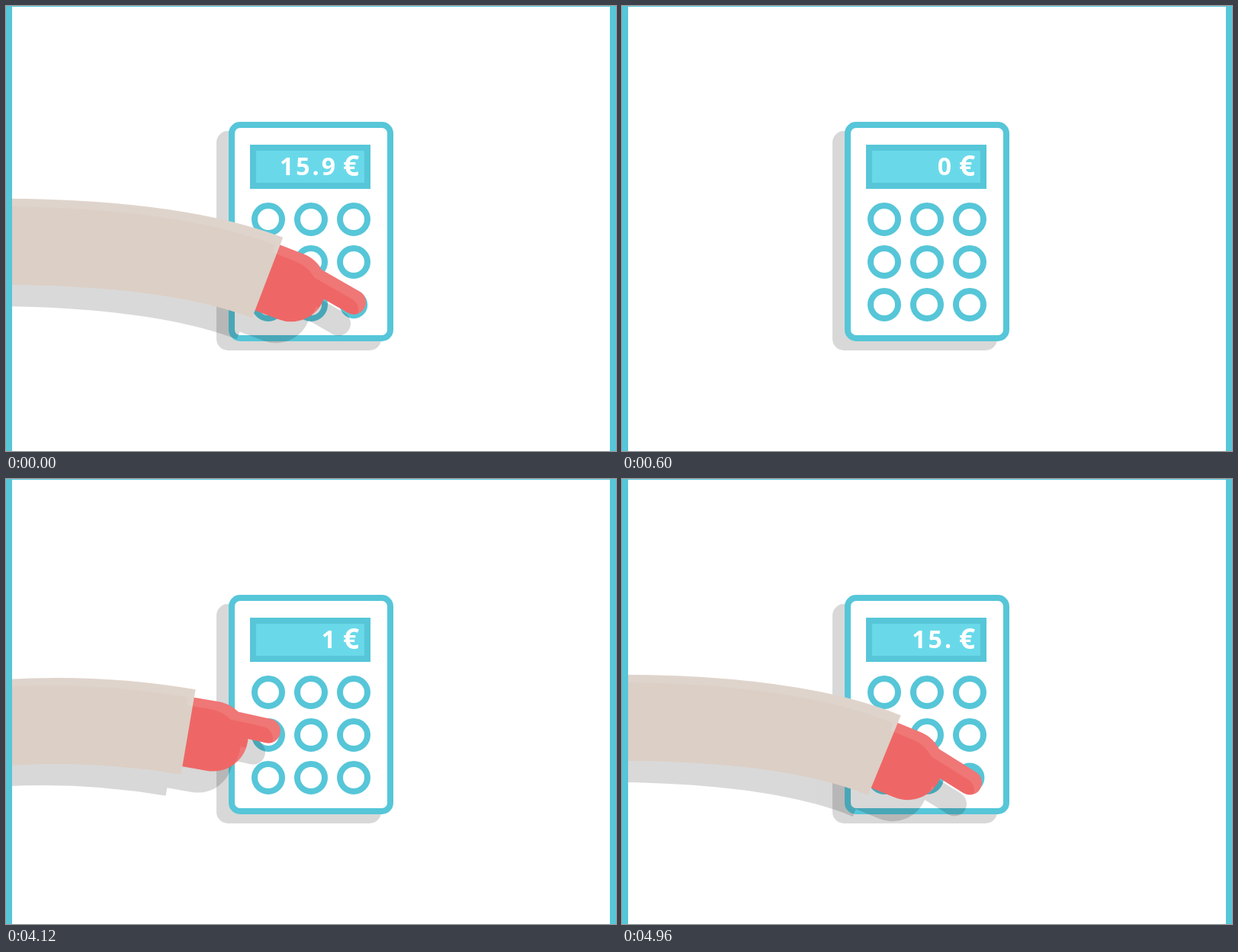
These frames come from a looping animation (800 by 584 pixels, 5000 ms). An HTML page:

```html
<!DOCTYPE html>
<html lang="en">
<head>
<meta charset="utf-8">
<title>Calculator</title>
<style>
  html, body { margin: 0; height: 100%; overflow: hidden; background: #fff; }
  svg { display: block; width: 800px; height: 584px; }
  text { font: 700 32px "Open Sans", "Noto Sans", sans-serif; fill: #fff; }
</style>
</head>
<body>
<svg viewBox="0 0 800 584">
  <defs>
    <g id="hand" fill="none" stroke-linecap="round">
      <path id="palm" stroke-width="92"/>
      <path id="finger" stroke-width="32"/>
    </g>
    <path id="sleeve" fill="none" stroke-width="113"/>
    <g id="arm"><use href="#hand"/><use href="#sleeve"/></g>
    <rect id="body" x="296" y="156" width="208" height="280" rx="11" stroke-width="8"/>
    <mask id="rim" maskUnits="userSpaceOnUse" x="0" y="0" width="800" height="584">
      <rect width="800" height="584" fill="#fff"/>
      <use href="#arm" x="-10" y="10" stroke="#000"/>
    </mask>
  </defs>
  <g opacity=".15"><use href="#body" x="-16" y="12" stroke="#000"/></g>
  <use href="#body" fill="#fff" stroke="#56c6d8"/>
  <rect x="324" y="186" width="150" height="50" fill="#69d9e9" stroke="#56c6d8" stroke-width="8"/>
  <text id="digits" x="435" y="222" text-anchor="end" letter-spacing="3">0</text>
  <text x="442" y="223" style="font-size:37px">€</text>
  <g id="keys" fill="#fff" stroke="#56c6d8"></g>
  <g id="actor">
    <use href="#arm" x="-20" y="28" stroke="#000" opacity=".15"/>
    <use href="#hand" stroke="#ee6766"/>
    <use href="#sleeve" stroke="#dccfc6"/>
    <g mask="url(#rim)"><use href="#arm" stroke="#fff" opacity=".11"/></g>
  </g>
  <path d="M0 0H800V584H792V1H8V584H0Z" fill="#56c6d8"/>
</svg>
<script>
const $ = id => document.getElementById(id);
const LOOP = 5000, ENTER = 3360, EXIT = 5600;
const OFFSTAGE = { x: -10, y: 262 };

const presses = [
  { at: 3750, leave: 3930, key: 0, shows: "1" },
  { at: 4280, leave: 4350, key: 6, shows: "15" },
  { at: 4690, leave: 4750, key: 7, shows: "15." },
  { at: 4955, leave: 4980, key: 8, shows: "15.9" },
  { at: 5240, leave: 5410, key: 2, shows: "0" }
];

const keys = Array.from({ length: 9 }, (_, i) => {
  const el = document.createElementNS("http://www.w3.org/2000/svg", "circle");
  const key = { el, x: 344 + i % 3 * 56, y: 280 + Math.floor(i / 3) * 56 };
  el.setAttribute("cx", key.x);
  el.setAttribute("cy", key.y);
  $("keys").appendChild(el);
  return key;
});

const easeIn = u => u * u;
const easeOut = u => 1 - (1 - u) ** 2;
const easeInOut = u => u * u * (3 - 2 * u);
const bump = (t, centre, width) => Math.max(0, 1 - Math.abs(t - centre) / width);

// The fingertip hops from key to key and dips at each press
function tipAt(t) {
  const i = presses.findIndex(p => p.leave > t);
  const next = presses[i], last = i < 0 ? presses.at(-1) : presses[i - 1];
  const from = last ? keys[last.key] : OFFSTAGE, to = next ? keys[next.key] : OFFSTAGE;
  const begin = last ? last.leave : ENTER, end = next ? next.at - 40 : EXIT;
  const ease = !last ? easeOut : !next ? easeIn : easeInOut;
  const u = ease(Math.min(1, (t - begin) / (end - begin)));
  const hop = last && next ? 108 * u * (1 - u) : 0;
  const dip = Math.max(...presses.map(p => 7 * bump(t, p.at, 60)));
  return { x: from.x + (to.x - from.x) * u, y: from.y + (to.y - from.y) * u - hop + dip };
}

// The rest of the arm follows from where the fingertip is on the keypad
function drawArm(tip) {
  const across = (tip.x - 342) / 114, u = Math.max(0, across), v = (tip.y - 280) / 112;
  const angle = (6 - .4 * u + v * (8.2 + 7.6 * u ** 3)) * Math.PI / 180;
  const cos = Math.cos(angle), sin = Math.sin(angle);
  const from = (p, x, y) => ({ x: p.x + x * cos - y * sin, y: p.y + x * sin + y * cos });
  const reach = Math.max(47, 70 + 14 * across), drop = -19 - 3 * u + 12 * u ** 3 * v;

  const palm = from(tip, -reach, -drop), knuckle = from(palm, 10, -22), cuff = from(palm, -33, 0);
  const shoulder = { x: Math.min(-8, cuff.x - 40), y: 301 - 37.5 * u + v * (44 + 3 * u) };
  const bend = from(cuff, -Math.min(130, (cuff.x - shoulder.x) / 2), 0);

  const path = (id, d) => $(id).setAttribute("d", d);
  path("palm", `M${cuff.x} ${cuff.y}L${palm.x} ${palm.y}`);
  path("finger", `M${knuckle.x} ${knuckle.y}L${tip.x} ${tip.y}`);
  path("sleeve", `M${shoulder.x} ${shoulder.y}Q${bend.x} ${bend.y} ${cuff.x} ${cuff.y}`);
}

function draw(now) {
  let t = Math.floor(now % LOOP / 40) * 40;
  if (t < 1000) t += LOOP;

  const shown = presses.findLast(p => t >= p.at + 10);
  $("digits").textContent = shown ? shown.shows : "0";
  keys.forEach(({ el }, i) => {
    const press = presses.find(p => p.key === i);
    const depth = press ? bump(t, press.at + 40, 100) : 0;
    el.setAttribute("r", 18 - 6 * depth);
    el.setAttribute("stroke-width", 8 + 4 * depth);
  });

  const active = t > ENTER && t < EXIT;
  $("actor").style.display = active ? "" : "none";
  if (active) drawArm(tipAt(t));
}

const start = performance.now();
function tick() {
  draw(performance.now() - start);
  requestAnimationFrame(tick);
}
tick();
</script>
</body>
</html>
```
